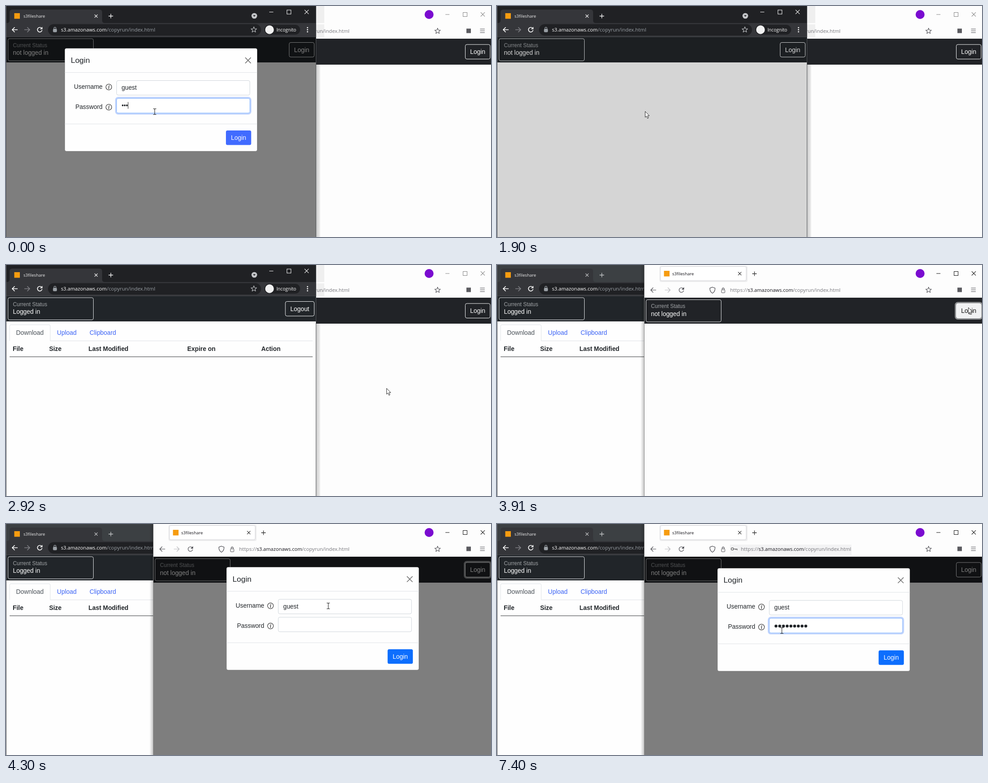
Write an HTML page that moves like this. It is 1085 px wide and 516 px high and loops after 7.99 s.

```html
<!DOCTYPE html>
<html lang="en">
<head>
<meta charset="utf-8">
<title>File share login</title>
<style>
  html, body { margin: 0; width: 100%; height: 100%; overflow: hidden; background: #fdfdfd; }
  svg { display: block; width: 100vw; height: 100vh; }
  text { font: 13.87px "Liberation Sans", Arial, sans-serif; white-space: pre; }
  .ui { font-family: "Open Sans", "Noto Sans", sans-serif; }
</style>
</head>
<body>
<svg id="stage" viewBox="0 0 1085 516" preserveAspectRatio="none"></svg>
<script>
const LOOP = 7990;
const stage = document.getElementById('stage');

// Value of the latest [time, value] pair that has begun
const step = (t, pairs) => pairs.reduce((v, [at, next]) => t >= at ? next : v, pairs[0][1]);

const rect = (x, y, w, h, fill, extra = '') =>
  `<rect x="${x}" y="${y}" width="${w}" height="${h}" fill="${fill}" ${extra}/>`;
const box = (x, y, w, h, fill, stroke, r = 3.5) =>
  rect(x, y, w, h, fill, `stroke="${stroke}" rx="${r}"`);
const circle = (x, y, r, fill, extra = '') =>
  `<circle cx="${x}" cy="${y}" r="${r}" fill="${fill}" ${extra}/>`;
const line = (d, stroke, w = 1, extra = '') =>
  `<path d="${d}" fill="none" stroke="${stroke}" stroke-width="${w}" ${extra}/>`;
const text = (x, y, s, fill, extra = '') => `<text x="${x}" y="${y}" fill="${fill}" ${extra}>${s}</text>`;
const uiText = (x, y, s, fill, size) => text(x, y, s, fill, `class="ui" style="font-size:${size}px"`);
const group = (x, y, body, opacity = 1) =>
  `<g transform="translate(${x} ${y})" opacity="${opacity}">${body}</g>`;
const ring = (x, y, w, h, color, opacity) =>
  rect(x - 1.7, y - 1.7, w + 3.4, h + 3.4, 'none',
    `stroke="${color}" stroke-width="3.4" rx="5" opacity="${opacity}"`);

// Icons, each around its own centre
const cross = (x, y, r, c, w) =>
  line(`M${x - r} ${y - r}l${2 * r} ${2 * r}m0 ${-2 * r}l${-2 * r} ${2 * r}`, c, w);
const plus = (x, y, c) => line(`M${x - 5} ${y}h10m-5 -5v10`, c, 1.3);
const arrow = (x, y, dir, c, w) =>
  line(`M${x - 6 * dir} ${y}h${12 * dir}m${-5.5 * dir} -5.5l${5.5 * dir} 5.5l${-5.5 * dir} 5.5`, c, w);
const reload = (x, y, c, w) =>
  line(`M${x + 4} ${y - 3.5}a5.2 5.2 0 1 0 1.2 4.4`, c, w) +
  `<path d="M${x + 6} ${y - 6.5}v5.5h-5.5z" fill="${c}"/>`;
const star = (x, y, c) => {
  const pts = Array.from({ length: 10 }, (_, i) => {
    const a = i * Math.PI / 5 - Math.PI / 2, r = i % 2 ? 2.9 : 6.6;
    return (x + r * Math.cos(a)).toFixed(1) + ' ' + (y + r * Math.sin(a)).toFixed(1);
  });
  return line(`M${pts.join('L')}z`, c, 1.1, 'stroke-linejoin="round"');
};
const lock = (x, y, c, filled) =>
  rect(x - 3.8, y - 1.5, 7.6, 6.5, filled ? c : 'none', `stroke="${c}" rx="1"`) +
  line(`M${x - 2.3} ${y - 1.5}v-1.8a2.3 2.3 0 0 1 4.6 0v1.8`, c, 1.2);
const controls = (x, y, c) =>
  line(`M${x} ${y}h9`, c) + rect(x + 39.5, y - 4.5, 9, 9, 'none', `stroke="${c}"`) +
  cross(x + 83.5, y - 0.3, 4.6, c, 1.1);

const pointer = (x, y) =>
  `<path transform="translate(${x} ${y})" d="M.5 .5V13.6L3.5 10.9L5.7 16L8 15L5.8 10.1H9.8z" fill="#fff" stroke="#111" stroke-width=".9"/>`;
const beam = (x, y) =>
  line(`M${x - 3.5} ${y - 6.5}h2.5l1 1l1 -1h2.5M${x} ${y - 5.5}v11M${x - 3.5} ${y + 6.5}h2.5l1 -1l1 1h2.5`, '#222', 1.1);

const statusBox = (x, y, w, status) =>
  box(x, y, w, 49.5, 'none', '#e4e6e8') +
  text(x + 11, y + 18.5, 'Current Status', '#a2a5a8', 'style="font-size:11.9px"') +
  text(x + 11, y + 36, status, '#fff');

const navButton = (x, y, w, label, { lit = 0, glow = 0 } = {}) =>
  (glow ? ring(x, y, w, 32.5, '#f8f9fa', glow) : '') +
  box(x, y, w, 32.5, `rgba(248,249,250,${lit})`, '#f8f9fa') +
  text(x + w / 2, y + 21.3, label, lit > 0.5 ? '#111' : '#fff', 'text-anchor="middle"');

const infoIcon = (x, y) =>
  circle(x, y, 6.5, 'none', 'stroke="#222" stroke-width="1.1"') +
  circle(x + 0.8, y - 3, 0.9, '#222') + line(`M${x - 1.3} ${y - 0.7}h1.8l-.9 4.3h1.2`, '#222', 1.1);

// Login dialog, 430.5 by 230
function dialog({ blue, dots, radius, pitch, dotX, dotY, caret, focus, press }) {
  const label = (y, s) => text(84.5, y, s, '#212529', 'text-anchor="end"');
  let s = box(0, 0, 430.5, 230, '#fefefe', 'rgba(0,0,0,.25)', 4) +
    text(13.5, 32.5, 'Login', '#212529', 'style="font-size:17.4px"') +
    cross(410, 27, 6.3, '#777', 1.7) +
    line('M0 54h430.5M0 169h430.5', '#dee2e6') +
    label(90.7, 'Username') + label(135.7, 'Password') +
    infoIcon(98.5, 86.5) + infoIcon(98.5, 131.5) +
    box(116, 72, 298, 32.5, '#fff', '#ced4da') +
    text(127, 92.7, 'guest', '#212529');
  if (focus) s += ring(116, 112, 298, 32.5, '#bfd3fd', focus);
  s += box(116, 112, 298, 32.5, '#fff', focus > 0.3 ? '#86b7fe' : '#ced4da');
  for (let i = 0; i < dots; i++) s += circle(dotX + pitch * (i + 0.5), dotY, radius, '#212529');
  if (caret) s += line(`M${dotX + pitch * dots + 0.4} ${dotY - 7.5}v15`, '#222');
  if (press) s += ring(360.5, 183.5, 56.5, 32.5, blue, press * 0.45);
  return s + rect(360.5, 183.5, 56.5, 32.5, blue, 'rx="3.5"') +
    (press ? rect(360.5, 183.5, 56.5, 32.5, '#000', `rx="3.5" opacity="${press * 0.15}"`) : '') +
    text(388.8, 204.5, 'Login', '#fff', 'text-anchor="middle"');
}

function darkWindow(t, front) {
  const c = front ? '#fff' : '#c8c9cb';
  const loggedIn = t >= 2280;
  const shade = step(t, [[0, 0.5], [1900, 0.16], [2020, 0]]);
  const tabs = step(t, [[0, 0], [2280, 0.45], [2400, 1]]);
  let s = rect(0, 0, 693.5, 516, '#fefefe') +
    rect(0, 0, 693.5, 40, front ? '#202124' : '#3c4043') +
    '<path d="M2 38q6 0 6 -6V14q0 -6 6 -6H209q6 0 6 6v18q0 6 6 6z" fill="#35363a"/>' +
    rect(0, 38, 693.5, 31.5, '#35363a') +
    rect(18.5, 16, 12.5, 12.5, '#f69c10') +
    uiText(39, 26, 's3fileshare', '#eee', 9.6) + cross(201.5, 22.5, 3.4, c, 1.3) + plus(234.5, 22.5, c) +
    circle(555.5, 22, 6.3, '#c4c6c9') + '<path d="M552.5 20.5h6l-3 3.6z" fill="#202124"/>' +
    controls(589, 13.5, '#fff') +
    arrow(20, 53, -1, '#fff', 1.7) + arrow(47, 53, 1, '#7d7e82', 1.7) + reload(75.5, 53, '#fff', 1.7) +
    rect(94, 40.5, 476.5, 25.5, '#202124', 'rx="12.7"') + lock(109.5, 53, '#9aa0a6', true) +
    uiText(123, 57, 's3.amazonaws.com', '#fff', 11.2) +
    uiText(225.5, 57, '/copyrun/index.html', '#9aa0a6', 11.4) + star(554.5, 53, '#c8cacd') +
    rect(578, 42, 80, 22, '#202124', 'rx="11"') + circle(589.5, 53, 9.7, '#f1f1f1') +
    uiText(605, 56.6, 'Incognito', '#fff', 10.2) +
    [48.3, 53, 57.7].map(y => circle(674.5, y, 1.4, '#fff')).join('') +
    rect(0, 69, 693.5, 57, '#212529') + line('M0 69h693', '#4b4d51') +
    statusBox(4.5, 73, 191, loggedIn ? 'Logged in' : 'not logged in') +
    (loggedIn ? navButton(625, 81.5, 64.5, 'Logout')
      : navButton(633.5, 81.5, 56, 'Login', { glow: step(t, [[0, 0], [2140, 0.5]]) }));
  if (tabs) {
    const heads = [[15, 'File'], [96.5, 'Size'], [184.5, 'Last Modified'], [405.5, 'Expire on'], [571, 'Action']];
    s += group(0, 0,
      line('M8 169.5V136.5q0 -3 3 -3h85q3 0 3 3v33H686', '#dee2e6') +
      text(22.5, 156, 'Download', '#495057') +
      text(114, 156, 'Upload', '#3a62f5') + text(187, 156, 'Clipboard', '#3a62f5') +
      heads.map(([x, h]) => text(x, 191.5, h, '#212529', 'font-weight="700" style="font-weight:700"')).join('') +
      line('M8 205h678', '#2b2e31', 1.1), tabs);
  }
  if (shade) s += rect(0, 69.5, 693.5, 447, '#000', `opacity="${shade}"`);
  if (t < 1900) {
    const fading = t >= 1780;
    s += group(131.5, fading ? 84.5 : 94.5, dialog({
      blue: '#416bff', radius: 1.9, pitch: 4.67, dotX: 127.2, dotY: 127.5,
      dots: step(t, [[0, 3], [250, 4], [370, 5], [680, 7], [830, 8], [1200, 9]]),
      caret: t < 1350,
      focus: step(t, [[0, 1], [1350, 0.4], [1480, 0]]),
      press: step(t, [[0, 0], [1350, 0.6], [1480, 1]])
    }), fading ? 0.5 : 1);
  }
  return s + line('M.5 0V516M693.5 0V516', '#55575a');
}

function lightWindow(t, front) {
  const c = front ? '#111' : '#858585';
  const keyed = t >= 5780, dx = keyed ? 24 : 0;
  const shade = step(t, [[0, 0], [4060, 0.3], [4180, 0.5]]);
  let s = rect(330, 0, 755, 516, '#fdfdfd') +
    rect(363.5, 2, 197, 36, '#ededee', 'rx="4"') +
    box(365.5, 3.5, 192, 31.5, '#fff', '#d4d4d8', 3) +
    rect(373.5, 13, 12.5, 12.5, '#f69c10') + uiText(392, 23.2, 's3fileshare', '#15141a', 9.6) +
    cross(543, 19.3, 3.6, '#222', 1.1) + plus(576, 19.5, '#333') +
    circle(946.5, 19, 10, '#7a0bd0') + controls(983, 19, c) +
    arrow(350, 56, -1, '#4a4a50', 1.2) + arrow(381.5, 56, 1, '#b9b9bd', 1.2) + reload(412.5, 56, '#4a4a50', 1.2) +
    line('M482 49.5l5.8 2.2q.2 8 -5.8 11.3q-6 -3.3 -5.8 -11.3z', '#4a4a50', 1.2) + lock(506, 57, '#4a4a50', false);
  if (keyed) {
    s += rect(521, 46, 272, 23, '#f3f3f4') + circle(526.5, 55.8, 2.7, 'none', 'stroke="#555" stroke-width="1.2"') +
      line('M529.2 55.8h8v3m-3 -3v2.3', '#555', 1.2);
  }
  s += uiText(521.5 + dx, 60.3, 'https://', '#77777c', 11.6) +
    uiText(561 + dx, 60.3, 's3.amazonaws.com', '#15141a', 11.1) +
    uiText(662 + dx, 60.3, '/copyrun/index.html', '#77777c', 11.2) +
    star(965.5, 56, '#4a4a50') + rect(1030, 50.5, 10, 10, '#5b5b60') +
    line('M1060.5 51.5h10.5m-10.5 4h10.5m-10.5 4h10.5', '#4a4a50', 1.1) +
    rect(330, 73, 755, 58, '#212327') +
    statusBox(333.5, 77.5, 168, 'not logged in') +
    navButton(1027.5, 86, 55.5, 'Login', {
      lit: step(t, [[0, 0], [3790, 0.75], [3910, 0.97], [4060, 0.4], [4180, 0]]),
      glow: step(t, [[0, 0], [3910, 0.5], [4450, 0]])
    });
  if (shade) s += rect(330, 73.5, 755, 443, '#000', `opacity="${shade}"`);
  if (t >= 4180) {
    const y = step(t, [[0, 76], [4300, 96.2], [4450, 98.7]]);
    s += group(493.2, y, dialog({
      blue: '#0d6efd', radius: 3.3, pitch: 8.33, dotX: 126.8, dotY: 129.3,
      dots: step(t, [[0, 0], [5780, 1], [6080, 2], [6330, 3], [6480, 4], [6600, 5], [6720, 7], [6840, 8], [7400, 9]]),
      caret: t >= 5390 && t < 7400,
      focus: step(t, [[0, 0], [5270, 0.4], [5390, 0.85], [5510, 1]])
    }), t < 4300 ? 0.5 : 1);
  }
  if (!front) {
    s += rect(690, 0, 22, 38, '#efefef') + rect(690, 41, 22, 28.5, 'rgba(0,0,0,.05)') +
      rect(693, 131, 10, 385, 'url(#rightShadow)');
  }
  return s;
}

function cursor(t) {
  const [x, y] = step(t, [
    [0, [332.7, 236]], [1900, [331, 235]], [2400, [480, 252]], [2530, [625, 246]],
    [2680, [722, 256]], [2800, [816, 270]], [2920, [851, 275]],
    [3370, [950, 200]], [3490, [1040, 138]], [3640, [1049, 102]], [3790, [1054, 94.5]],
    [4060, [1040, 99]], [4180, [850, 150]], [4300, [721, 183]], [4450, [690, 222]],
    [4580, [662, 255]], [5000, [646, 243]], [5130, [637.3, 238]]
  ]);
  return (t < 1900 || t >= 4300 ? beam : pointer)(x, y);
}

const fade = (id, from, to) =>
  `<linearGradient id="${id}"><stop stop-color="#000" stop-opacity="${from}"/>` +
  `<stop offset="1" stop-color="#000" stop-opacity="${to}"/></linearGradient>`;
const defs = `<defs>${fade('rightShadow', 0.22, 0.05)}${fade('leftShadow', 0, 0.24)}</defs>`;

function scene(t) {
  const swapped = t >= 3070;
  const dark = darkWindow(t, !swapped), light = lightWindow(t, swapped);
  const layers = swapped
    ? dark + rect(321, 0, 9, 516, 'url(#leftShadow)') + light + line('M329.5 0V516', '#8a8a8a')
    : light + dark;
  return defs + layers + cursor(t);
}

let shown = '';
function tick() {
  const next = scene(performance.now() % LOOP);
  if (next !== shown) stage.innerHTML = shown = next;
  requestAnimationFrame(tick);
}
tick();
</script>
</body>
</html>
```
